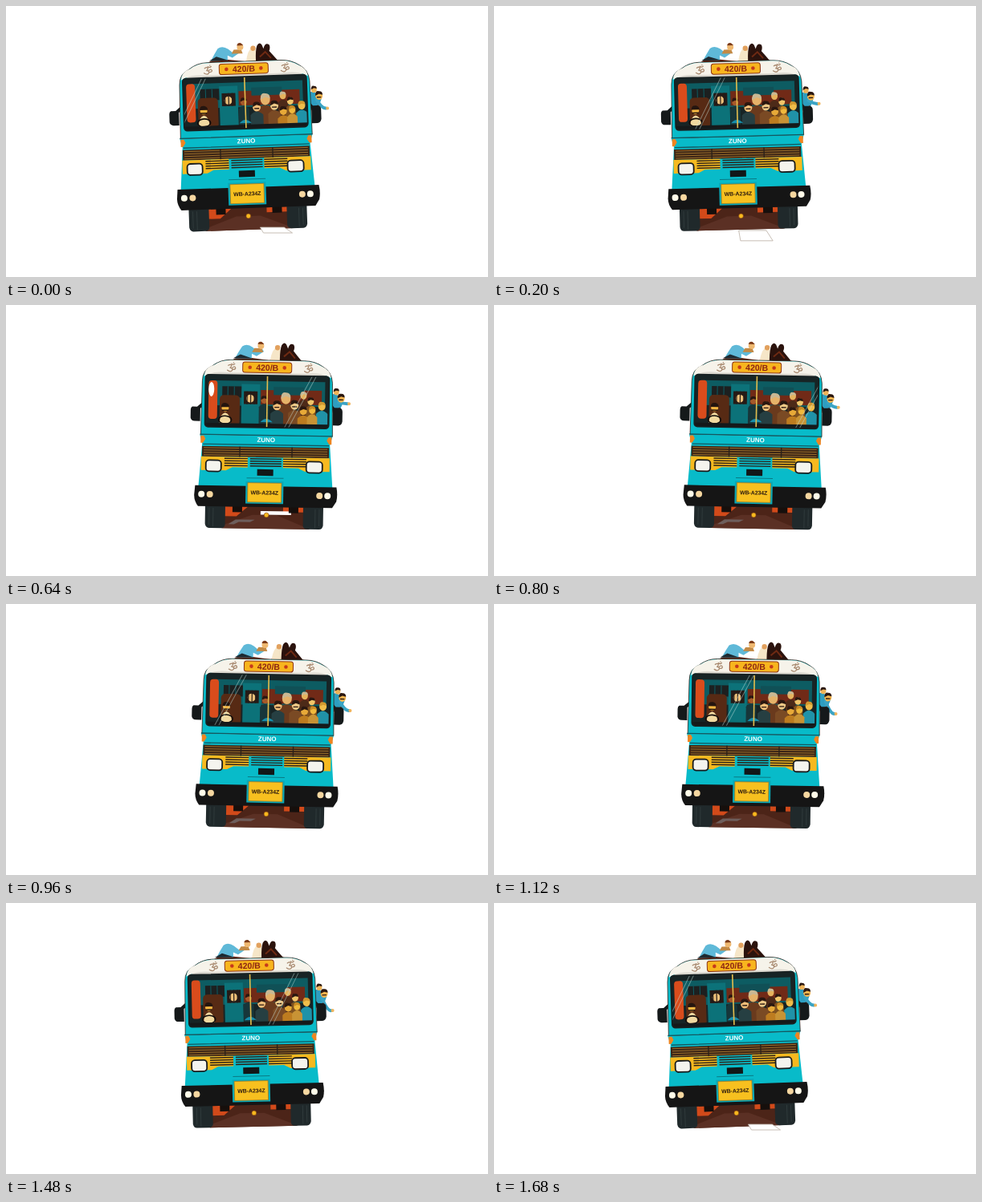
These frames come from a looping animation (600x338 px, 1760 ms). An HTML page:

```html
<!DOCTYPE html>
<html lang="en">
<head>
<meta charset="utf-8">
<title>Crowded bus</title>
<style>
html, body { margin: 0; width: 100%; height: 100%; overflow: hidden; background: #fff; }
svg { display: block; width: 100vw; height: 100vh; }
text { font-family: "Liberation Sans", Arial, sans-serif; font-weight: 700; text-anchor: middle; }
</style>
</head>
<body>
<svg viewBox="0 0 600 338">
  <defs>
    <clipPath id="glass"><rect x="239" y="88" width="154" height="65" rx="4"/></clipPath>
    <g id="om" fill="none" stroke="#a98a70" stroke-width="1.3" stroke-linecap="round">
      <path d="M-4-3q3-2 4 0q0 2-2 3q4 0 3 3q-2 3-6 0M1 0q3-3 4 0q0 2-3 2M0-5q2 2 4 0M2.500-6.500h.2"/>
    </g>
  </defs>

  <g id="bus">
    <!-- ground shadow, wheels and axle -->
    <path d="M262 250H370V279H262Z" fill="#4c2418"/>
    <path d="M264 252H294L280 264H264ZM338 252H364V258H338Z" fill="#d24a1a"/>
    <path d="M258 277L300 262H330L372 279H262Z" fill="#5b3024"/>
    <path id="streak" d="M270 274L279 268H303L297 271H283L277 274Z" fill="#777274"/>
    <rect id="slit" y="257" fill="#fff"/>
    <path d="M275 250h12v9h-12ZM345 250h12v9h-12Z" fill="#160f0c"/>
    <path d="M241 249H266V275Q265 279 261 279H246Q242 279 241 274ZM363 249H388V274Q387 279 383 279H368Q364 279 363 275Z" fill="#20292b"/>
    <path d="M246 254v21M251 254v23M378 254v23M383 254v21" stroke="#303b3c"/>
    <circle id="ball" cy="262" r="2.900" fill="#f7b91f" stroke="#7c3b10" stroke-width=".6"/>

    <!-- people on the roof -->
    <path d="M272 69Q281 63 294 66L318 69L332 63L360 69Z" fill="#58200f"/>
    <path d="M275 67Q280 58 284 52Q290 48 297 53L303 58L309 55L311 58L302 64L296 61V67Z" fill="#5fb9d8"/>
    <path d="M273 67L282 62L297 67Z" fill="#1d2a31"/>
    <g id="mate">
      <path d="M303 59L306 54H315L317 59Z" fill="#c38a45"/>
      <circle cx="314" cy="51" r="4" fill="#efb870"/>
      <path d="M310 49Q311 45 315 46L318 49Z" fill="#7c3b18"/>
    </g>
    <path d="M319 69Q321 55 327 52Q333 53 335 69Z" fill="#f6e6c8"/>
    <circle cx="328" cy="53" r="3.200" fill="#e2a15e"/>
    <path d="M331 68Q331 55 333 50Q336 45 339 49L341 54Q343 46 348 49Q350 52 348 57L353 63L358 69H331Z" fill="#2b130d"/>
    <path d="M336 64L343 58L350 66" fill="none" stroke="#6e2a13" stroke-width="2"/>

    <!-- people hanging from the side -->
    <path d="M395 111Q402 107 406 114L411 119L407 129L396 131Z" fill="#2e9ec0"/>
    <path id="arm" fill="none" stroke="#3aa4c4" stroke-width="4" stroke-linecap="round"/>
    <circle id="hand" r="2" fill="#f0b45c"/>
    <path d="M396 132L407 126L404 134Z" fill="#7c2c14"/>

    <!-- mirrors -->
    <path d="M236 122L229 128H223Q221 129 221 132V142Q222 146 226 146H233V130L237 127ZM394 120L400 127H407Q410 128 410 132V144Q409 149 405 149H398V131L394 127Z" fill="#15191a"/>

    <!-- shell -->
    <path d="M235 96Q235 82 247 77Q257 69 270 69H362Q375 69 385 76Q396 82 397 96L398 163H234Z" fill="#08bbc9" stroke="#33211a" stroke-width=".8"/>
    <path d="M237 90Q238 79 249 76Q258 69.500 271 69.500H361Q374 69.500 384 76Q394 80 395 90L389 87H243Z" fill="#f6f3ea"/>
    <path d="M242 88Q250 83 268 85H364Q382 83 390 88Z" fill="#dcd9d0"/>
    <use href="#om" x="271" y="79"/><use href="#om" x="367" y="79"/>
    <rect x="285" y="71.500" width="61" height="13" rx="3" fill="#f8b51e" stroke="#8d3413"/>
    <text x="315.500" y="81.800" font-size="10.500" fill="#8b2414">420/B</text>
    <circle cx="294" cy="78" r="2.300" fill="#c63a1b"/><circle cx="337" cy="78" r="2.300" fill="#c63a1b"/>

    <!-- windscreen -->
    <g clip-path="url(#glass)">
      <rect x="239" y="88" width="154" height="65" fill="#172425"/>
      <path d="M250 95H388V126H250Z" fill="#0d5c62"/>
      <path d="M260 102H285V116H260Z" fill="#1c2020"/>
      <path d="M267 102v14M275 102v14" stroke="#0d5c62"/>
      <rect x="243" y="95" width="11" height="48" rx="4" fill="#d94c1c"/>
      <ellipse id="sky" cx="246.500" cy="106" rx="3.500" ry="9" fill="#fff"/>
      <rect x="257" y="113" width="25" height="38" rx="5" fill="#572a14"/>
      <path d="M284 99H307V149H284Z" fill="#0c7279"/>
      <path d="M287 108H304V124H287Z" fill="#251b17"/>
      <circle cx="295" cy="117" r="5" fill="#ecc079"/>
      <path d="M291 108v16M295.500 108v16M300 108v16" stroke="#251b17" stroke-width="1.200"/>
      <path d="M308 106H384V124H308Z" fill="#712a17"/>
      <path d="M324 102H362V112H324Z" fill="#105056"/>
      <g id="crowd"></g>
      <path d="M257 148Q258 136 264 135Q270 136 271 148Z" fill="#f1d9a0"/>
      <circle cx="264" cy="129" r="4.500" fill="#f3b540"/>
      <path d="M259 128Q259 122 265 123Q269 124 269 128Z" fill="#24150f"/>
      <path d="M260 132H268" stroke="#24150f" stroke-width="1.500"/>
      <ellipse cx="264" cy="144" rx="8" ry="5" fill="none" stroke="#120d0b" stroke-width="1.600"/>
      <path d="M308 146Q315 138 323 146Z" fill="#168dab"/>
      <path d="M239 148H393V153H239Z" fill="#15191a"/>
      <path d="M316 88V153" stroke="#e3bd4d" stroke-width="1.600"/>
      <path id="shine" d="M-17 153L17 88M-12 153L22 88" stroke="#c9e4df" opacity=".45"/>
    </g>
    <rect x="239" y="88" width="154" height="65" rx="4" fill="none" stroke="#172021" stroke-width="1.800"/>

    <!-- nose -->
    <path d="M233 163H398L395 174L399 228H232L236 174Z" fill="#08bbc9"/>
    <path d="M233 162.500H398M237 174.500H394" stroke="#125860" stroke-width="1.300"/>
    <path d="M234 164h4l2 4l-3 5h-3ZM397 164h-4l-2 4l3 5h3Z" fill="#ee8521"/>
    <text x="315.500" y="171" font-size="8" fill="#fff">ZUNO</text>
    <path d="M236 177H394V190H236Z" fill="#3c2516"/>
    <path d="M235 190H395V207H364L356 203H337V190H293V203H274L266 207H235Z" fill="#f6b91f"/>
    <path id="slats" fill="none"/>
    <path id="vents" stroke="#2c2219" stroke-width="1.400"/>
    <rect x="305" y="205" width="20" height="8" fill="#111718"/>
    <path d="M292 216H338" stroke="#0a7a84"/>
    <g fill="#f4f4ee" stroke="#181b1c" stroke-width="1.800">
      <rect x="241" y="194.500" width="19" height="14" rx="4"/>
      <rect x="366" y="194.500" width="20" height="14" rx="4"/>
    </g>

    <!-- bumper -->
    <path d="M228 226H404Q406 236 404 244L399 252H232Q227 246 227 238Z" fill="#151515"/>
    <rect x="291" y="220" width="47" height="28" fill="#0aa9b7"/>
    <rect x="293.500" y="222" width="42" height="24" fill="#f7c01f" stroke="#a8761a" stroke-width=".7"/>
    <text x="314.500" y="236.500" font-size="6.900" fill="#2b1a10">WB-A234Z</text>
    <circle cx="236" cy="237" r="4" fill="#fffbe9"/><circle cx="246.500" cy="237" r="4" fill="#f6d7a0"/>
    <circle cx="383" cy="237" r="4" fill="#f6d7a0"/><circle cx="393" cy="237" r="4" fill="#fffbe9"/>
    <g id="riders"></g>
  </g>
  <path id="dash" fill="#fff" stroke="#b9aea2" stroke-width=".8"/>
</svg>
<script>
const PERIOD = 1680, LOOP = 1760, STEP = 40;
const $ = id => document.getElementById(id);
const set = (id, attrs) => {
  for (const k in attrs) $(id).setAttribute(k, attrs[k]);
};
const wave = (t, peak) => Math.cos(2 * Math.PI * (t - peak) / PERIOD);

function head(x, y, r, skin, hair, beard) {
  const cap = `M${x - r} ${y}Q${x - r} ${y - r * 1.5} ${x} ${y - r * 1.25}Q${x + r} ${y - r * 1.3} ${x + r} ${y - 1}L${x} ${y - r * .5}Z`;
  const lip = beard ? `<path d="M${x - r * .6} ${y + r * .4}h${r * 1.2}" stroke="#291710" stroke-width="1.300"/>` : '';
  return `<ellipse cx="${x}" cy="${y}" rx="${r}" ry="${r * 1.15}" fill="${skin}"/><path d="${cap}" fill="${hair}"/>${lip}`;
}

function rider(x, y, r, skin, hair, shirt, beard) {
  const w = r * 1.6;
  return `<path d="M${x - w} 153V${y + r + 5}Q${x} ${y + r - 3} ${x + w} ${y + r + 5}V153Z" fill="${shirt}"/>` + head(x, y, r, skin, hair, beard);
}

const DARK = '#2a1710', GREY = '#c9b893';
$('crowd').innerHTML = [
  [313, 119, 4, '#a65a2b', DARK, '#17363a'],
  [362, 113, 4, '#e6b35d', GREY, '#4d2a18'],
  [371, 120, 4, '#f0c56a', DARK, '#80521f'],
  [340, 117, 6, '#e5b269', GREY, '#6a3a1d'],
  [329, 126, 5, '#efbd78', DARK, '#263f42', 1],
  [351, 125, 5, '#edc886', DARK, '#7a4a24', 1],
  [362, 132, 4.5, '#e7a938', DARK, '#bd7c20'],
  [385, 126, 4.5, '#f0bd4a', '#d39a30', '#2092a8'],
  [373, 131, 4, '#f0b93c', '#c98b24', '#c89335']
].map(p => rider(...p)).join('');

$('riders').innerHTML = head(402, 107, 3.5, '#eeb459', DARK) + head(408, 115, 4.5, '#f1b550', DARK, 1);

// grille bars
let bars = '';
for (let y = 179; y < 190; y += 3) bars += `M238 ${y}H392`;
set('slats', { d: bars, stroke: '#a3752c', 'stroke-width': .9 });
let gaps = 'M283 177V190M348 177V190';
for (let y = 192; y < 204; y += 3) gaps += `M264 ${y}H293M337 ${y}H366M296 ${y}H335`;
set('vents', { d: gaps });

function road(t, sway) {
  const p = (t % 560) / 560;
  const x = 335 - 100 * p ** 4 - 55 * sway;
  const top = 276 + 11 * p, bottom = top + 7 + 21 * p * (1 - p * .6);
  const w = 15 + 6 * p, lean = 18 - 30 * sway;
  const far = [x - w - lean * .2, x + w - lean * .2];
  const near = [x - w - 3 + lean * .2, x + w + 3 + lean * .2];
  const clear = sway > .8 || p > .62;
  set('dash', {
    d: `M${far[0]} ${top}H${far[1]}L${near[1]} ${bottom}H${near[0]}Z`,
    opacity: clear ? 0 : 1
  });
}

function draw(t) {
  const c = (1 + wave(t, 857)) / 2;
  const sway = 1 - (1 - c) ** 1.487;
  set('bus', { transform: `translate(${21 * sway - 13} 0) rotate(${3.1 * sway - 2} 315 270)` });

  const roll = Math.sin(Math.PI * t / 840) ** 2;
  set('ball', { cx: 315 + 5 * roll });
  set('mate', { transform: `translate(${-3.5 * (1 + wave(t, 540))} 0)` });
  set('crowd', { transform: `translate(${wave(t, 0)} ${.7 * wave(2 * t, 300)})` });

  const y = 129 + 9 * wave(t, 1320);
  set('arm', { d: `M405 120Q411 ${y} 416 ${y}` });
  set('hand', { cx: 418, cy: y });

  set('shine', { transform: `translate(${246 + .17 * (t % 840)} 0)` });
  const open = t >= 400 && t <= 700;
  const grow = Math.min(1, Math.max(0, (t - 400) / 240));
  set('slit', { x: 325 - 15 * grow, width: open ? 24 + 14 * grow : 0, height: 2 + 2.5 * grow });
  set('sky', { opacity: open || Math.abs(t - 1320) < 80 ? 1 : 0 });
  set('streak', { opacity: sway > .55 ? .7 : 0 });
  road(t, sway);
}

function tick(now) {
  draw(Math.min(Math.floor(now % LOOP / STEP) * STEP, PERIOD));
  requestAnimationFrame(tick);
}
tick(performance.now());
</script>
</body>
</html>
```
